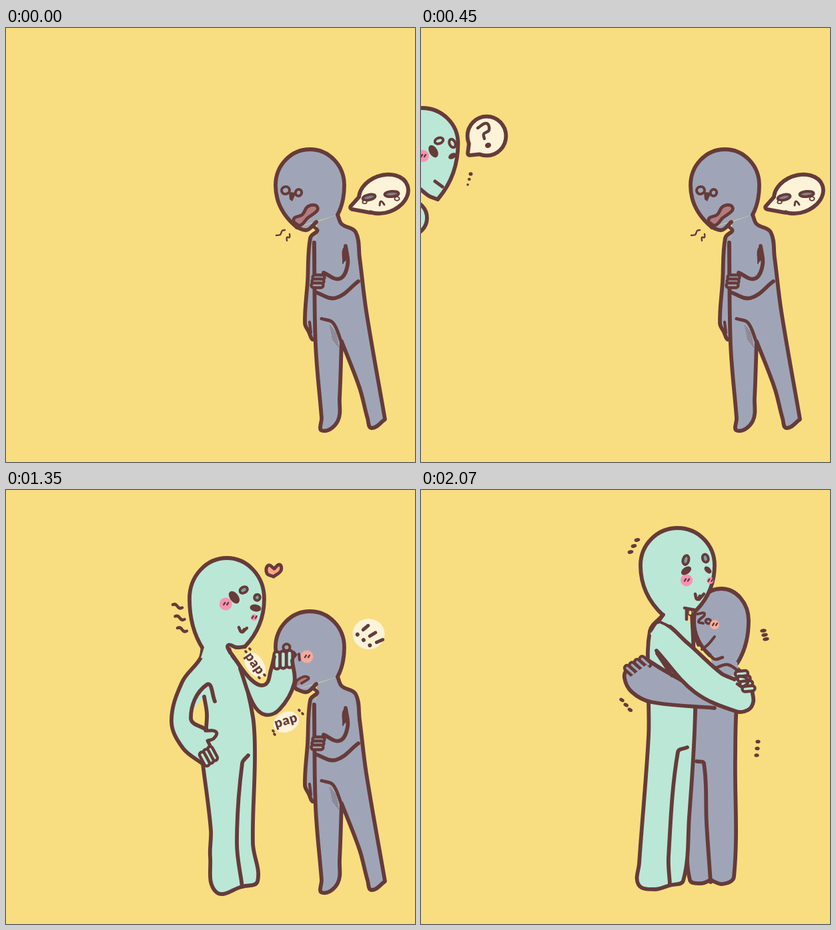
These frames come from a looping animation (613x651 px, 2.25 s). An HTML page:

```html
<!DOCTYPE html>
<html lang="en">
<head>
<meta charset="utf-8">
<title>A hug</title>
<style>
html, body { margin: 0; width: 100%; height: 100%; overflow: hidden; background: #f8de80; }
svg { display: block; width: 100%; height: 100%; }
text { font: 900 20px Lato, sans-serif; letter-spacing: .8px; fill: #663b3a; text-anchor: middle; dominant-baseline: middle; }
</style>
</head>
<body>
<svg id="stage" viewBox="0 0 613 651" stroke-linecap="round" stroke-linejoin="round"></svg>
<script>
const INK = '#663b3a', MINT = '#bbe7d7', GREY = '#9fa5b7', CREAM = '#fdf3d8', SKY = '#f8de80';
const PINK = '#f792b2', PEACH = '#f3aaa0', MOUTH = '#b27b7c', SHADE = '#7fa096';
const STEP = 450, W = 5.8;

const repeat = (n, draw) => Array.from({ length: n }, (_, i) => draw(i)).join('');

// Smooth curve through a few "x,y" points; "!" marks a corner.
function curve(str) {
  const pts = str.split(' ').map(s => ({ p: s.replace('!', '').split(',').map(Number), sharp: s.endsWith('!') }));
  const heading = (a, b) => {
    const d = [b[0] - a[0], b[1] - a[1]], len = Math.hypot(...d) || 1;
    return d.map(v => v / len);
  };
  const tangent = (i, from, to) => {
    const prev = pts[i - 1], next = pts[i + 1];
    return prev && next && !pts[i].sharp ? heading(prev.p, next.p) : heading(from, to);
  };
  return pts.slice(1).reduce((d, { p: b }, i) => {
    const a = pts[i].p, reach = Math.hypot(b[0] - a[0], b[1] - a[1]) * .35;
    const ta = tangent(i, a, b), tb = tangent(i + 1, a, b);
    return d + `C${a.map((v, k) => v + ta[k] * reach)} ${b.map((v, k) => v - tb[k] * reach)} ${b}`;
  }, 'M' + pts[0].p);
}

const path = (d, fill, w, color = INK) => `<path d="${d}" fill="${fill}" stroke="${w ? color : 'none'}" stroke-width="${w}"/>`;
const shape = (pts, fill, w = W) => path(curve(pts), fill, w);
const lines = (w, ...all) => all.map(p => shape(p, 'none', w)).join('');
const flat = (pts, fill) => `<polygon points="${pts}" fill="${fill}"/>`;
const oval = (x, y, rx, ry, rot = 0, fill = INK, w = 0) =>
  `<ellipse cx="${x}" cy="${y}" rx="${rx}" ry="${ry}" transform="rotate(${rot} ${x} ${y})" fill="${fill}" stroke="${w ? INK : 'none'}" stroke-width="${w}"/>`;
const ring = (x, y, rx, ry, rot, fill) => oval(x, y, rx, ry, rot, fill, 4);
const word = (s, x, y, rot) => `<text transform="translate(${x} ${y}) rotate(${rot})">${s}</text>`;

// A half-ellipse crown whose sides run down to two points, left and right.
function head(x, y, rx, ry, left, right, fill) {
  const bend = p => y + (p[1] - y) * .58;
  return path(`M${left}Q${x - rx},${bend(left)} ${x - rx},${y}A${rx} ${ry} 0 0 1 ${x + rx},${y}Q${x + rx},${bend(right)} ${right}`, fill, W);
}

// Parallel rounded fingers: roots step by (dx, dy), each reaches (lx, ly).
const fingers = (n, x, y, dx, dy, lx, ly, fill, w = 8) => repeat(n, i => {
  const d = `M${x + i * dx},${y + i * dy}l${lx},${ly}`;
  return path(d, 'none', w + 4.4) + path(d, 'none', w - 4.4, fill);
});

// Oval and tail merged under one outline.
const bubble = (x, y, rx, ry, rot, tail) => [2 * W, 0].map(w =>
  `<polygon points="${tail}" fill="${CREAM}" stroke="${w ? INK : 'none'}" stroke-width="${w}"/>` +
  oval(x, y, rx, ry, rot, CREAM, w)).join('');

const trail = (x, y, dx, dy, r, rot = 0, shrink = 1) =>
  repeat(3, i => oval(x + i * dx, y + i * dy, r * shrink ** i, 2.7 * shrink ** i, rot));

const bangs = (x, y, dx, dy, angle, turn, len) => repeat(3, i =>
  `<g transform="translate(${x + i * dx} ${y + i * dy}) rotate(${angle + i * turn})">` +
  path(`M${-len / 2},0h${len}`, 'none', 5) + oval(len / 2 + 11, 0, 3, 3) + '</g>');

const blush = (x, y, r, fill = PINK) => oval(x, y, r, r, 0, fill) +
  repeat(2, i => path(`M${x - 3 + i * 5},${y + 1}l2,-3`, 'none', 2.4));

// Mint eye: a brow ring lies toward `dir`, a blush lies on the far side.
function eye(x, y, r, tilt, dir, gap, brow, browTilt, cheek, fill = SHADE) {
  const a = dir * Math.PI / 180, dx = Math.sin(a) * gap, dy = -Math.cos(a) * gap;
  return (cheek ? blush(x - dx * .9, y - dy * .9, cheek) : '') +
    ring(x + dx, y + dy, 4.3, brow, browTilt, fill) + oval(x, y, r * .62, r, tilt);
}

const greyBody =
  shape('466,305 456,315 452,380 448,443 454,456 459,467 464,466! 462,322', GREY) +
  lines(4.2, '455,441 457,457') +
  flat('465,291 497,280 503,294 510,330 462,322 467,304', GREY) +
  shape('497,280 503,294 524,306 530,345 540,425 568,587! 548,600 542,586 530,540 503,470! 500,555 497,590 474,604 473,585 464,475 462,322', GREY) +
  head(455.5, 236, 51.5, 54, [436, 299], [497, 280], GREY) +
  shape('436,299 451,303 465,291', GREY) +
  lines(5, '465,291 461,297 467,304 458,311', '473,436 490,442 503,472') +
  lines(W, '509,327 512,355 500,376 476,367', '463,396 494,405 528,380') +
  shape('505,353 508,328 513,345', INK, 2) +
  fingers(3, 474, 374, -1, 6, -11, 0, GREY, 7) +
  repeat(6, i => path(`M${485 + i * .8},${446 + i * 4}l10,13`, 'none', .6));

const sadFace =
  ring(419, 243.5, 6, 5.5, -20, GREY) + ring(438.5, 247, 4.6, 5, 20, GREY) +
  flat('424,246 435,247 429,260 425,257', INK) +
  shape('431,291! 432,285 444,280 452,268 464,266 467,273 452,285 441,296 431,291', MOUTH, 4.8) +
  lines(2.4, '405,311 411,310 414,304 418,303', '421,319 421,314 425,314 425,309');

const sadBubble =
  bubble(566, 249, 35, 25, -20, '519,269 536,250 546,274') +
  ring(544, 254, 9.5, 4, -12, '#858187') + ring(578, 249, 10.5, 4, -5, '#858187') +
  oval(537.5, 261, 3.2, 2.4, 0, CREAM, 1.8) + oval(586, 256, 3.6, 2.8, 0, CREAM, 1.8) +
  lines(3, '560,266 562,260 567,265');

const waiting = greyBody + sadFace + sadBubble;

const peeking =
  oval(-17, 285, 26, 26, 0, MINT, W) +
  head(1.5, 173, 54, 53, [-20, 235], [25, 257], MINT) + lines(W, '25,257 12,252 -3,240') +
  blush(3, 192, 9) +
  eye(18.5, 185, 10, -30, 28, 18, 6.5, 70, 0, MINT) + eye(47, 192, 6.5, 58, 0, 19, 6.5, -25, 0, MINT) +
  lines(5, '21,230 32,238') +
  bubble(98.5, 162, 26, 26.5, 0, '73,188 75,172 92,186') +
  lines(4.4, '85,150 98,143 102,153 94,159 95,166') + oval(100.5, 176, 4.6, 4, -20) +
  trail(74.5, 219, -2.2, 8, 3, 0, .8);

const walking =
  shape('168,448 140,545 134,588 148,602 164,610! 166,575 193,498', MINT) +
  flat('162,247 191,237 228,400 221,441 208,405', MINT) +
  shape('191,237 198,257 218,268 230,318 227,400 221,441', MINT) +
  shape('161,247 162,262! 157,300 161,390 170,452 235,560 262,603 285,602 309,583 293,582! 262,520 221,441 208,405! 220,397', MINT) +
  head(162, 170, 53, 53, [162, 249], [207, 236], MINT) +
  lines(W, '207,236 199,241 191,237 198,257', '162,262 171,260 181,263', '207,256 220,285 227,320') +
  shape('230,304 240,311 256,305! 262,318', MINT, 5) +
  repeat(3, i => path(`M${229 + i * 4},${309 + i * 2}l2,11`, 'none', .7)) +
  shape('159,332 178,361 210,368 262,353 281,328! 253,319 214,333 188,314 180,289', MINT, 0) +
  lines(W, '180,289 184,310 195,321', '188,314 214,333 253,319', '159,332 178,361 210,368 262,353 281,332') +
  fingers(4, 258, 315, .7, 5.8, 19, -5, MINT, 8.5) +
  eye(206, 170, 8, 32, -16, 14, 8, -45, 5) + eye(175, 176, 10, 32, -20, 13, 9, 15, 8) +
  oval(199.5, 213, 9.6, 14, 17, MOUTH, 4.6) + oval(201, 208, 7, 7.5, 15, CREAM, 1.5) +
  bubble(258, 107, 33.5, 38, 0, '243,146 239,134 262,142') +
  bangs(237, 111, 19, -6, 54, 13, 18) +
  trail(125.5, 519.5, -3.5, 12, 6, 18) + trail(290, 293, 6.4, 9, 3.2, 15);

const comforting = greyBody +
  ring(420.5, 236, 5, 5, -20, GREY) + flat('425,245 432,241 437,247 431,255', INK) +
  blush(451, 250, 9.5, PEACH) + lines(4, '439,246 440,255') +
  shape('433,296 437,285 453,281 443,290', MOUTH, 3.8) +
  shape('333,234 337,245 352,268 370,340 373,400 370,530 377,587 354,595! 315,603 306,550 307,510 295,411! 265,387 248,347 264,288 291,253 295,236', MINT) +
  shape('297,310 277,342 300,359! 301,336 297,310', SKY, 0) +
  lines(W, '313,317 301,292 277,342 301,360', '297,310 301,335 300,358', '363,398 354,410 346,530 354,595') +
  shape('299,361 315,363 311,373 302,376! 316,403', MINT, 5) +
  fingers(3, 306, 389, -6, 4, 7, 13, MINT) +
  head(331, 163, 56, 61, [295, 238], [358, 235], MINT) +
  flat('297,236 332,232 337,252 292,252', MINT) +
  lines(W, '358,235 345,236 333,233 336,244') +
  // raised arm
  shape('343,248 368,285 388,292 397,270 402,250! 428,252! 432,290 410,329 388,337 370,320 351,268', MINT, 0) +
  fingers(3, 406, 264, 9.5, -1, 0, -17, MINT, 9) +
  lines(W, '338,246 368,285 388,292 397,270 402,250', '351,268 370,320 388,337 410,329 432,290 429,256') +
  eye(342, 161, 10.5, -36, 52, 18, 6, 60, 9.5) + eye(374, 177, 8.5, 100, 9, 16, 4.5, 20, 5) +
  lines(4.4, '349,206 353,213 357,209', '355,213 361,207') +
  repeat(3, i => path(`M${250 + i * 3.5},${172 + i * 17.5}q4,-2 7,2.5t7,2`, 'none', 4.4)) +
  shape('402,118! 393,113 391,125 401,130! 412,121 410,112 402,118!', '#f9a489', 5) +
  oval(373, 262, 21, 13, 55, CREAM) + word('pap', 372, 261, 55) +
  oval(420, 348, 20, 15, -25, CREAM) + word('pap', 420, 347, -17) +
  [[359, 242, 6, -4], [379, 281, 8, -4], [439, 330, 5, 5], [400, 361, 2, 5]].map(([x, y, dx, dy]) =>
    repeat(2, i => path(`M${x + i * dx},${y + i * dy}l1,1`, 'none', 3.8))).join('') +
  oval(543.5, 216, 24, 23, 0, CREAM) + bangs(539, 206.5, 10.5, 10, 140, 8, 10);

const hugging =
  shape('411,330 400,510 403,585 420,590 434,585! 452,591 469,580 471,400 473,325 481,278 460,262 440,267', GREY) +
  lines(W, '413,407 424,410 428,500 434,588') +
  head(450, 196, 41, 48, [433, 248], [474, 260], GREY) +
  flat('433,249 474,258 476,272 440,272', GREY) +
  lines(4.6, '433,248 441,254 452,251', '441,267 460,262 481,276') +
  shape('363,187 343,212 341,300 341,370 327,560 326,592 350,599 373,593! 393,586 402,490 411,330 407,200', MINT) +
  lines(W, '399,386 385,393 371,550 373,592', '406,188 408,210 416,232') +
  // grey arm behind the back, then the mint arm over it
  shape('395,288 360,268 340,255! 310,268 305,282 316,303 345,318 440,327', GREY) +
  fingers(4, 318, 275, 7.5, -4.5, -9, -8, GREY) +
  flat('313,281 338,262 355,280 330,300', GREY) +
  shape('343,213 358,197 400,230 450,275 487,283 498,318 472,332 410,303 353,241', MINT, 0) +
  lines(W, '343,212 358,197 400,230 450,275 470,284', '353,241 410,303 472,332 490,330 498,318 496,300', '354,245 376,278') +
  fingers(4, 475, 276, 3.5, 7.5, 11, -1, MINT) +
  lines(4.6, '470,284 478,279 490,286 482,295 474,291') +
  head(384.5, 113, 55.5, 56, [363, 188], [413, 180], MINT) +
  flat('363,184 397,175 400,203 372,202 359,196', MINT) +
  lines(W, '363,187 355,198') + lines(4.6, '395,177 411,180', '398,180 398,194') +
  oval(403.5, 184, 3, 4, 0, SKY, 2) +
  eye(397.5, 121, 8.5, 55, -2, 16, 7, 15, 9) + eye(430, 120, 6.5, -45, -12, 18, 6, -15, 5) +
  lines(4.6, '411,156 414,164 418,159', '417,164 424,156') +
  lines(4, '414,186 425,186 416,197 423,200', '421,239 430,232 440,220') +
  ring(430.5, 197, 4, 3.2, 20, GREY) + blush(440, 202, 7, '#f7b19f') +
  trail(324, 75, -5, 9, 4.4, -12) + trail(513, 211, 2, 6.3, 4.8, -10) +
  trail(301, 315, 6.2, 7.4, 4, 30) + trail(505, 377.5, -1, 10.2, 3.6);

const poses = [waiting, waiting + peeking, waiting + walking, comforting, hugging];
const stage = document.getElementById('stage');
stage.innerHTML = `<rect width="613" height="651" fill="${SKY}"/>` + poses.map(p => `<g class="pose">${p}</g>`).join('');
const groups = [...stage.querySelectorAll('.pose')];

function update(ms) {
  const now = Math.floor(ms / STEP) % poses.length;
  groups.forEach((g, i) => { g.style.display = i === now ? '' : 'none'; });
}

function frame() {
  update(performance.now());
  requestAnimationFrame(frame);
}
frame();
</script>
</body>
</html>
```
